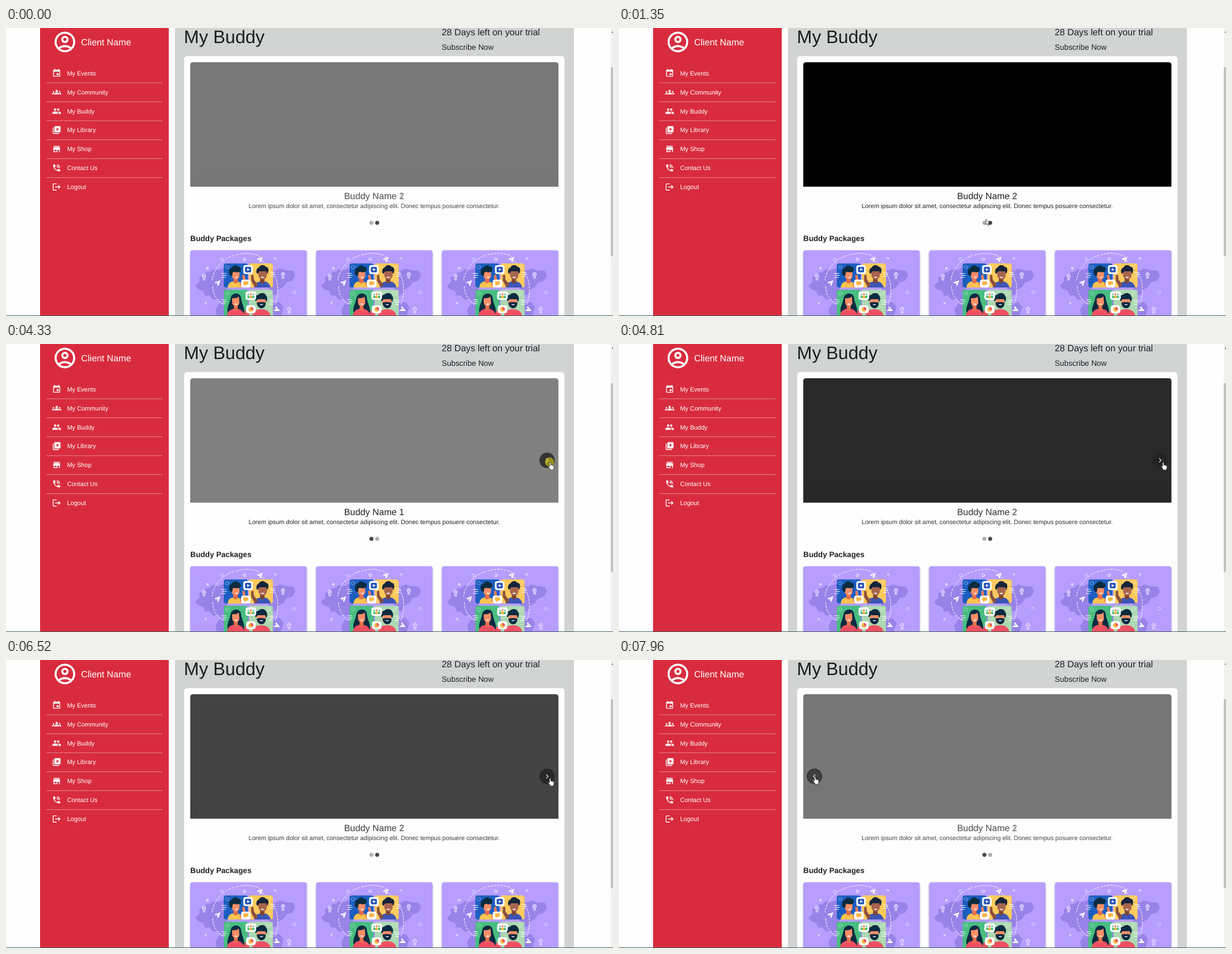
Write an HTML page that moves like this. It is 1087 px wide and 515 px high and loops after 8 s.

```html
<!DOCTYPE html>
<html lang="en">
<head>
<meta charset="utf-8">
<title>My Buddy</title>
<style>
  html, body { margin: 0; width: 100%; height: 100%; overflow: hidden; background: #fefefe; }
  svg { display: block; }
  text { font-family: "Liberation Sans", Arial, sans-serif; text-rendering: geometricPrecision; }
  .title { font-size: 16.28px; }
  .small { font-size: 11.07px; }
  .mid { text-anchor: middle; fill: #212121; }
  .line { fill: none; stroke: #fff; stroke-linecap: round; }
</style>
</head>
<body>
<svg id="stage" width="1087" height="515" viewBox="0 0 1087 515">
  <defs>
    <filter id="shadow" x="-10%" y="-10%" width="120%" height="120%">
      <feDropShadow dx="0" dy="1.4" stdDeviation="1.8" flood-opacity=".38"/>
    </filter>
    <clipPath id="tl"><rect x="390" y="416" width="43" height="48" rx="4"/></clipPath>
    <clipPath id="tr"><rect x="435" y="416" width="43" height="48" rx="4"/></clipPath>
    <path id="plane" d="M-5 -1 L6 -5 L2 6 L0 1.5 L4 -3 L-1.5 1 Z" fill="#fff"/>
    <g id="pin">
      <path d="M0 4 C-5 -1 -3 -5 0 -5 C3 -5 5 -1 0 4 Z" fill="#b69dff" stroke="#fff" stroke-width="1"/>
      <circle cy="-1.5" r="1.1" fill="#fff"/>
      <ellipse cy="5" rx="2.6" ry="1" fill="none" stroke="#fff" stroke-width=".7"/>
    </g>
    <path id="cross" class="line" stroke-width=".9" d="M-1.8 -1.8 L1.8 1.8 M1.8 -1.8 L-1.8 1.8"/>
    <path id="star" d="M0 -3 L.9 -.9 L3 -.7 L1.4 .8 L1.9 3 L0 1.8 L-1.9 3 L-1.4 .8 L-3 -.7 L-.9 -.9 Z" fill="#e9e2ff"/>
    <path id="lines" class="line" stroke-width="1.2" d="M0 0 H8 M2 3.5 H9 M0 7 H7"/>

    <g id="art">
      <rect x="330" y="397.5" width="208.5" height="125" rx="4" fill="#b69dff" filter="url(#shadow)"/>
      <g fill="#9883e8">
        <path d="M339 461 L347 453 L346 446 L357 438 L365 436 L371 431 L381 433 L388 429 L396 431 V492 L384 490 L380 484 L371 486 L364 478 L357 479 L353 470 L344 467 Z"/>
        <path d="M470 430 L482 434 L490 430 L500 433 L514 434 L518 443 L512 452 L502 455 L497 463 L488 468 L484 477 L470 480 Z"/>
        <path d="M381 494 L396 486 H470 L480 492 L490 490 L497 499 L492 515 H378 L375 504 Z"/>
      </g>
      <path class="line" stroke-width="1" stroke-dasharray="3.5 2.5"
            d="M408 407 C390 411 371 431 369 451 M370 462 C371 477 377 486 388 493 M412 406 C427 401 445 402 455 409 M459 417 C472 425 482 440 486 456 C488 475 485 487 482 494"/>
      <g class="line" stroke-width="1">
        <circle cx="386.5" cy="413.5" r="2.5" stroke-dasharray="1 1.6"/>
        <circle cx="427" cy="413.5" r="2.4"/>
        <circle cx="516.5" cy="473" r="2.6" stroke-dasharray="1 1.6"/>
      </g>
      <use href="#plane" x="454" y="414"/>
      <use href="#plane" x="378" y="456"/>
      <use href="#plane" transform="translate(484 502) rotate(70)"/>
      <use href="#cross" x="482" y="412"/>
      <use href="#cross" x="357.5" y="492"/>
      <use href="#star" x="361" y="429.5"/>
      <use href="#star" x="401" y="504"/>
      <use href="#pin" x="354.5" y="445"/>
      <use href="#pin" x="496" y="442"/>
      <use href="#pin" x="507" y="504"/>

      <rect x="390" y="421" width="43" height="43" rx="4" fill="#1d5fc0"/>
      <rect x="435" y="421" width="43" height="43" rx="4" fill="#fdca5d"/>
      <rect x="390" y="468" width="43" height="50" rx="4" fill="#49bd82"/>
      <rect x="435" y="468" width="43" height="50" rx="4" fill="#add9b3"/>
      <g class="line" stroke-width=".7" opacity=".6">
        <circle cx="396" cy="427.5" r="3"/><circle cx="471" cy="427.5" r="3"/>
        <circle cx="396" cy="474.5" r="3"/><circle cx="471" cy="474.5" r="3"/>
      </g>

      <g clip-path="url(#tl)">
        <path d="M397 464 C398 455 403 453 410 453 C419 453 423 457 424 464 Z" fill="#fcc44f"/>
        <path d="M418 459 L424 449 L423 442 L427 441 L429 450 L423 464 Z" fill="#f47f5b"/>
        <path d="M407 446 H415 V455 Q411 458 407 455 Z" fill="#e86d4d"/>
        <path d="M404 434 H418 V443 C418 451 406 452 404 443 Z" fill="#f98e68"/>
        <path d="M401 442 C397 435 401 429 404 429 C407 423 414 424 416 427 C421 427 422 432 419 436 C414 438 408 435 406 437 L405 444 Z" fill="#0b2b40"/>
        <path d="M410 445 Q413 449 416 445 Z" fill="#fff"/>
      </g>
      <g clip-path="url(#tr)">
        <path d="M444 464 C445 456 451 453 459 453 C467 453 472 456 474 464 Z" fill="#3b55b5"/>
        <path d="M446 464 L439 452 L439 442 L443 441 L444 450 L451 459 Z" fill="#8b4f3f"/>
        <path d="M455 446 H463 V455 Q459 458 455 455 Z" fill="#7e4438"/>
        <path d="M452 434 H467 V443 C466 452 454 452 452 443 Z" fill="#a8654e"/>
        <path d="M450 440 C446 434 450 429 453 428 C455 423 463 423 465 427 C470 427 472 433 468 440 L466 435 H454 Z" fill="#17253b"/>
        <path d="M456 445 Q459 449 463 445 Z" fill="#fff"/>
      </g>
      <path d="M399 515 C393 501 400 496 402 484 C404 472 420 472 421 483 C422 495 430 501 425 515 Z" fill="#0b2b40"/>
      <path d="M395 517 C397 505 403 502 411 502 C420 502 426 506 427 517 Z" fill="#ef5162"/>
      <path d="M408 495 H415 V504 Q411 507 408 504 Z" fill="#e86d4d"/>
      <path d="M405 483 Q413 484 417 480 L418 491 C417 500 406 500 405 491 Z" fill="#f98e68"/>
      <path d="M409 493 Q412 497 415 493 Z" fill="#fff"/>

      <path d="M440 517 C443 505 449 503 457 503 C466 503 473 506 474 517 Z" fill="#ef5162"/>
      <path d="M424 517 L428 505 L433 504 L437 517 Z" fill="#ef5162"/>
      <path d="M449 484 H465 V494 C463 502 451 502 449 494 Z" fill="#f98e68"/>
      <path d="M447 489 C445 481 448 477 452 477 C456 472 465 474 466 479 C469 481 468 487 466 490 L464 485 H451 Z" fill="#0b2b40"/>
      <path d="M449 491 Q457 489 465 491 C466 504 450 505 449 491 Z" fill="#0b2b40"/>
      <path d="M454 494 Q457 497 461 494 Z" fill="#fff"/>

      <g fill="#fff">
        <rect x="425" y="424" width="17" height="16" rx="4"/>
        <rect x="421" y="450" width="17" height="14" rx="4"/>
        <rect x="429" y="471" width="19" height="15" rx="4"/>
        <rect x="430" y="496" width="17" height="14" rx="4"/>
      </g>
      <rect x="428" y="427" width="11" height="10" rx="2" fill="#2c58b7"/>
      <path d="M432 429.5 L436.5 432 L432 434.5 Z" fill="#fff"/>
      <path d="M425 453 H434 V459 H430 L427 462 V459 H425 Z" fill="#fbb747"/>
      <g fill="#4abf84"><circle cx="434" cy="476.5" r="1.5"/><circle cx="443" cy="476.5" r="1.5"/><rect x="432" y="479" width="13" height="4" rx="1.5"/></g>
      <circle cx="438.5" cy="476" r="1.8" fill="#f9804f"/><rect x="436" y="478.6" width="5" height="4.6" rx="1.5" fill="#fbb747"/>
      <circle cx="438.5" cy="503" r="4.3" fill="#fbb747"/>
      <path d="M438.5 503 V498.700 A4.300 4.300 0 0 1 442.300 505.100 Z" fill="#ef5162"/>
      <use href="#lines" x="386" y="439"/>
      <use href="#lines" x="473" y="437"/>
      <use href="#lines" x="386" y="486"/>
      <use href="#lines" x="471" y="487"/>
    </g>
  </defs>

  <rect width="1087" height="515" fill="#fefefe"/>
  <rect x="61" width="230.500" height="515" fill="#d82c3e"/>
  <rect x="302.500" width="714.500" height="515" fill="#d2d4d3"/>
  <path d="M319 515 V56.500 Q319 50.300 325 50.300 H994 Q1000 50.300 1000 56.500 V515 Z" fill="#fefefe"/>

  <g fill="#fff">
    <path transform="translate(83.300 2.800) scale(1.850)" d="M12 2C6.480 2 2 6.480 2 12s4.480 10 10 10 10-4.480 10-10S17.520 2 12 2zM7.350 18.500C8.660 17.560 10.260 17 12 17s3.340.560 4.650 1.500c-1.310.940-2.910 1.500-4.650 1.500s-3.340-.560-4.650-1.500zm10.790-1.380C16.450 15.800 14.320 15 12 15s-4.450.800-6.140 2.120C4.700 15.730 4 13.950 4 12c0-4.420 3.580-8 8-8s8 3.580 8 8c0 1.950-.700 3.730-1.860 5.120zM12 6c-1.930 0-3.500 1.570-3.500 3.500S10.070 13 12 13s3.500-1.570 3.500-3.500S13.930 6 12 6zm0 5c-.830 0-1.500-.670-1.500-1.500S11.170 8 12 8s1.500.670 1.500 1.500S12.830 11 12 11z"/>
    <text class="title" x="134.500" y="31">Client Name</text>
    <g id="menu"></g>
  </g>

  <text x="318.600" y="27" font-size="32.500" fill="#1c1e1e">My Buddy</text>
  <text x="780.300" y="13" font-size="16.320" fill="#1d2029">28 Days left on your trial</text>
  <text x="780.300" y="39.300" font-size="13.830" fill="#1d2029">Subscribe Now</text>

  <g id="slides"></g>
  <circle id="dot1" cx="654.400" cy="348.300" r="3.600"/>
  <circle id="dot2" cx="664.700" cy="348.300" r="3.600"/>

  <text x="330" y="380.500" font-size="13.700" font-weight="700" fill="#212121">Buddy Packages</text>
  <use href="#art"/>
  <use href="#art" x="225.300"/>
  <use href="#art" x="450.600"/>

  <rect x="1083" width="4" height="515" fill="#f1f1f1"/>
  <rect x="1083" y="70" width="4" height="338" fill="#c1c1c1"/>
  <path d="M1084.500 8.500 L1087 5.500 V8.500 Z" fill="#505050"/>
  <rect y="514" width="1087" height="1" fill="#3f5a5e"/>

  <g id="prev" transform="translate(350 208)">
    <circle r="13.700" fill="#222" fill-opacity=".82"/>
    <circle class="ripple" r="12" fill="#fff"/>
    <path d="M1.700 -3.600 L-1.900 0 L1.700 3.600" fill="none" stroke="#ccc" stroke-width="1.400"/>
  </g>
  <g id="next" transform="translate(969 208)">
    <circle r="13.700" fill="#222" fill-opacity=".82"/>
    <circle class="ripple" r="12" fill="#fff"/>
    <path d="M-1.700 -3.600 L1.900 0 L-1.700 3.600" fill="none" stroke="#ccc" stroke-width="1.400"/>
  </g>

  <g id="cursor">
    <circle id="press" cx="-1.200" cy="-.500" r="8.300" fill="#ffee00" fill-opacity=".5"/>
    <path id="arrow" d="M0 0 V9.800 L2.300 7.700 L4 11.300 L5.700 10.500 L4.100 7 H7 Z" fill="#fff" stroke="#222" stroke-width=".8"/>
    <path id="hand" d="M-1.200 .500 Q0 -.900 1.200 .500 V5 Q2.500 4.300 3.200 5.400 Q4.600 4.900 5.100 6 Q6.700 5.700 6.800 7.300 V10 Q6.600 11.500 5.600 12.500 V13.800 H0 V12.500 Q-2.400 10 -3.600 7.600 Q-3 6 -1.200 7.800 Z" fill="#fff" stroke="#222" stroke-width=".8"/>
  </g>
</svg>

<script>
const LOOP = 8000, FADE = 500, DOT = 200;
const $ = id => document.getElementById(id);

const menu = [
  ["My Events", "M17 12h-5v5h5v-5zM16 1v2H8V1H6v2H5c-1.110 0-1.990.900-1.990 2L3 19c0 1.100.890 2 2 2h14c1.100 0 2-.900 2-2V5c0-1.100-.900-2-2-2h-1V1h-2zm3 18H5V8h14v11z"],
  ["My Community", "M12 12.750c1.630 0 3.070.390 4.240.900 1.080.480 1.760 1.560 1.760 2.730V18H6v-1.610c0-1.180.680-2.260 1.760-2.730 1.170-.520 2.610-.910 4.240-.910zM4 13c1.100 0 2-.900 2-2s-.900-2-2-2-2 .900-2 2 .900 2 2 2zm1.130 1.100C3.500 13.900 2.070 14.210 1.220 14.580.480 14.900 0 15.620 0 16.430V18h4.500v-1.610c0-.830.230-1.610.630-2.290zM20 13c1.100 0 2-.900 2-2s-.900-2-2-2-2 .900-2 2 .900 2 2 2zm4 3.430c0-.810-.480-1.530-1.220-1.850-.850-.370-2.280-.680-3.910-.480.400.680.630 1.460.630 2.290V18H24zM12 6a3 3 0 1 1 0 6 3 3 0 0 1 0-6z"],
  ["My Buddy", "M16 11a3 3 0 1 0 0-6 3 3 0 0 0 0 6zm-8 0a3 3 0 1 0 0-6 3 3 0 0 0 0 6zm0 2c-2.330 0-7 1.170-7 3.500V19h14v-2.500c0-2.330-4.670-3.500-7-3.500zm8 0c-.290 0-.620.020-.970.050 1.160.840 1.970 1.970 1.970 3.450V19h6v-2.500c0-2.330-4.670-3.500-7-3.500z"],
  ["My Library", "M4 6H2v14c0 1.100.900 2 2 2h14v-2H4V6zm16-4H8c-1.100 0-2 .900-2 2v12c0 1.100.900 2 2 2h12c1.100 0 2-.900 2-2V4c0-1.100-.900-2-2-2zm-8 12.500v-9l6 4.500z"],
  ["My Shop", "M20 4H4v2h16V4zm1 10v-2l-1-5H4l-1 5v2h1v6h10v-6h4v6h2v-6h1zm-9 4H6v-4h6v4z"],
  ["Contact Us", "M20 15.500c-1.250 0-2.450-.200-3.570-.570-.350-.110-.740-.030-1.020.240l-2.200 2.200c-2.830-1.440-5.150-3.750-6.590-6.590l2.200-2.210c.280-.260.360-.650.250-1C8.700 6.450 8.500 5.250 8.500 4c0-.550-.450-1-1-1H4c-.550 0-1 .450-1 1 0 9.390 7.610 17 17 17 .550 0 1-.450 1-1v-3.500c0-.550-.450-1-1-1zM19 12h2c0-4.970-4.030-9-9-9v2c3.870 0 7 3.130 7 7zm-4 0h2c0-2.760-2.240-5-5-5v2c1.660 0 3 1.340 3 3z"],
  ["Logout", "M17 7l-1.410 1.410L18.170 11H8v2h10.170l-2.580 2.580L17 17l5-5zM4 5h8V3H4c-1.100 0-2 .900-2 2v14c0 1.100.900 2 2 2h8v-2H4V5z"]
];
$("menu").innerHTML = menu.map(([label, icon], i) => {
  const y = 80.8 + i * 33.9;
  const rule = i < 6 ? `<rect x="72" y="${y + 16.7}" width="208.5" height="1" fill-opacity=".42"/>` : "";
  return `<path transform="translate(82.4 ${y - 8.3}) scale(.692)" d="${icon}"/>
    <text class="small" x="109.4" y="${y + 3.9}">${label}</text>${rule}`;
}).join("");

// Slide 1 lies above slide 2.
$("slides").innerHTML = [[2, "#000"], [1, "#808080"]].map(([n, color]) => `<g id="slide${n}">
  <path d="M330 283.800 V66 Q330 61.200 335 61.200 H984 Q989.300 61.200 989.300 66 V283.800 Z" fill="${color}"/>
  <text class="title mid" x="659.300" y="305.600">Buddy Name ${n}</text>
  <text class="small mid" x="659.300" y="322.200">Lorem ipsum dolor sit amet, consectetur adipiscing elit. Donec tempus posuere consectetur.</text>
</g>`).join("");

// [start, slide shown next]
const fades = [[-266, 2], [2681, 1], [4420, 2], [5288, 1], [6170, 2], [7730, 1]];
const clicks = [2550, 4330, 5150, 6100, 7600];
// [time, x, y] of the pointer
const path = [
  [70, 965, 486], [540, 864, 364], [870, 864, 364], [1180, 700, 331], [1350, 657, 342],
  [1480, 650, 344], [1680, 650, 344], [2090, 655, 349], [2900, 655, 349], [3440, 927, 180],
  [3510, 930, 183], [4130, 974.500, 211.500], [7060, 974.500, 211.500], [7540, 351, 208.500], [8000, 351, 208.500]
];

const clamp = v => Math.max(0, Math.min(1, v));
const ramp = (t, a, b) => clamp((t - a) / (b - a));
const ease = v => (1 - Math.cos(Math.PI * v)) / 2;
const mix = (a, b, v) => a + (b - a) * v;
const show = (el, v) => el.setAttribute("opacity", v);
const near = (p, x, y, r) => Math.hypot(p.x - x, p.y - y) < r;

function pointer(t) {
  const i = Math.max(1, path.findIndex(k => k[0] > t));
  const [a, b] = [path[i - 1], path[i]];
  const v = ease(ramp(t, a[0], b[0]));
  return { x: mix(a[1], b[1], v), y: mix(a[2], b[2], v) };
}

function paintDot(id, active, hover) {
  const c = Math.round(mix(mix(0xaf, 0x49, active), 0x2c, hover));
  $(id).setAttribute("fill", `rgb(${c},${c},${c})`);
}

function draw(t) {
  const [start, slide] = fades.filter(f => f[0] <= t).pop();
  const into = v => slide === 1 ? v : 1 - v;
  const first = into(ease(clamp((t - start) / FADE)));
  show($("slide1"), first);
  show($("slide2"), 1 - first);

  const on = into(clamp((t - start) / DOT));
  paintDot("dot1", on, ramp(t, 1850, 2050) - ramp(t, 2960, 3160));
  paintDot("dot2", 1 - on, 0);

  show($("next"), ramp(t, 3580, 3780) - ramp(t, 7120, 7260));
  show($("prev"), ramp(t, 7420, 7560));
  const since = t - (clicks.filter(c => c <= t).pop() ?? -LOOP);
  const wave = .1 * (ramp(since, 100, 180) - ramp(since, 340, 410));
  document.querySelectorAll(".ripple").forEach(el => show(el, wave));

  const p = pointer(t);
  const hand = near(p, 655, 348, 6) || near(p, 969, 208, 14) || near(p, 350, 208, 14);
  $("cursor").setAttribute("transform", `translate(${p.x} ${p.y})`);
  show($("cursor"), t < 70 ? 0 : 1);
  show($("arrow"), hand ? 0 : 1);
  show($("hand"), hand ? 1 : 0);
  show($("press"), since < 140 ? 1 : 0);
}

const begin = performance.now();
function tick() {
  draw((performance.now() - begin) % LOOP);
  requestAnimationFrame(tick);
}
tick();
</script>
</body>
</html>
```
